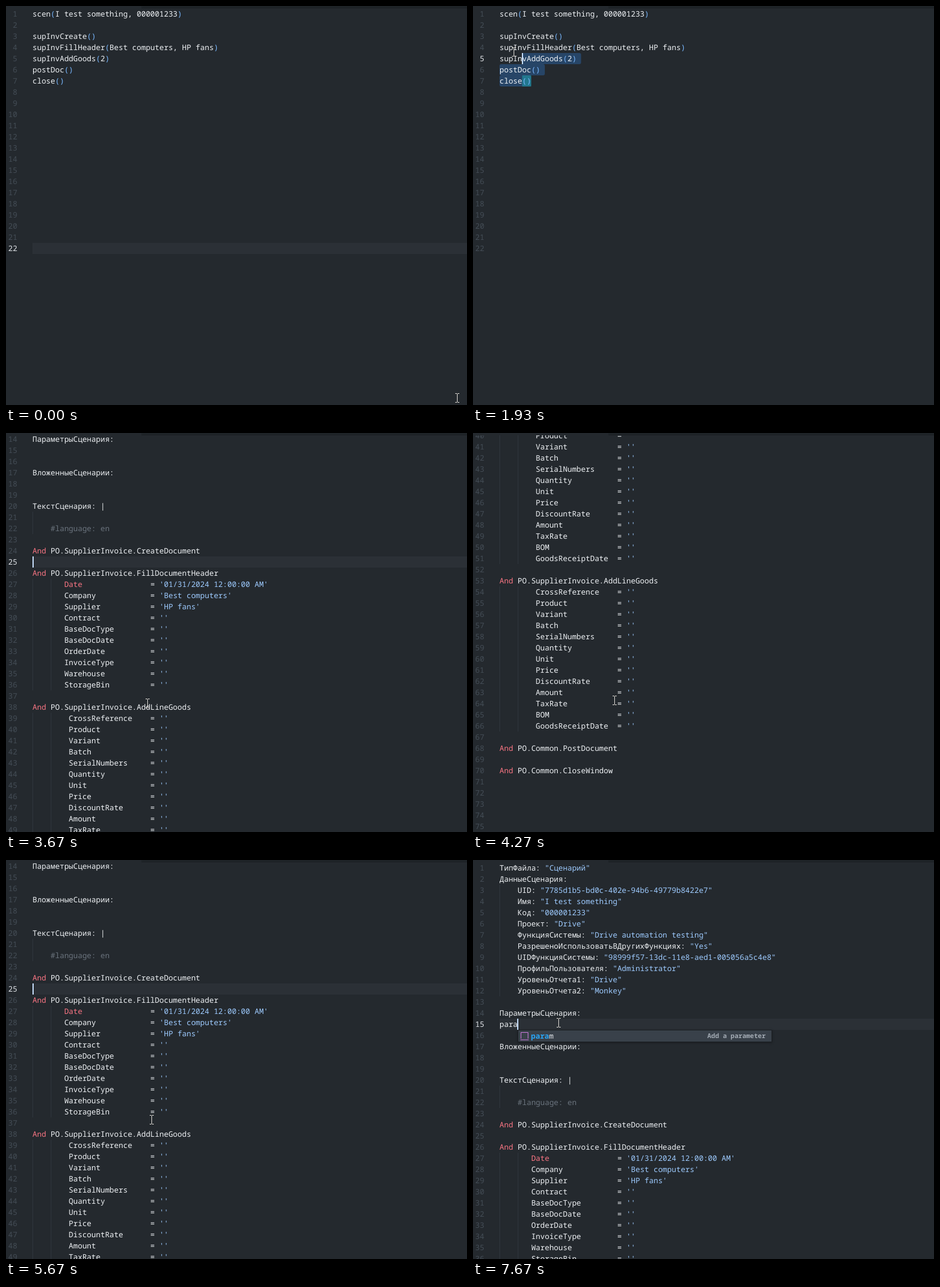
Write an HTML page with a canvas that moves like this. It is 783 by 679 pixels and loops after 8000 ms.

```html
<!DOCTYPE html>
<html lang="en">
<head>
<meta charset="utf-8">
<title>Scenario editor</title>
<style>
  html, body { margin: 0; width: 100%; height: 100%; overflow: hidden; background: #24292e; }
  canvas { display: block; }
</style>
</head>
<body>
<canvas id="stage" width="783" height="679"></canvas>
<script>
const ctx = document.getElementById('stage').getContext('2d');
const W = 783, H = 679, TOP = 4, ROW = 19, LEFT = 45, CH = 7.698;
const LOOP = 8000, TICKS_PER_MS = 15 / 1000;
const FAMILY = '"Noto Sans Mono", "DejaVu Sans Mono", monospace';
const FONT = `12.83px ${FAMILY}`;
const C = {
  bg: '#24292e', text: '#f0f3f6', string: '#9ecbff', keyword: '#f97583',
  comment: '#6a737d', bracket: '#79b8ff', number: '#444d56', guide: '#2f363d',
  line: '#2b3036', select: 'rgba(51,146,255,.27)', match: 'rgba(23,229,230,.31)',
  caret: '#c8e1ff', hit: '#2aa5f5'
};

// ---- documents ----
const blanks = n => Array(n).fill('');
const field = (indent, name, value = '') =>
  ' '.repeat(indent) + name.padEnd(26 - indent) + `= '${value}'`;

const script = [
  'scen(I test something, 000001233)', '',
  'supInvCreate()',
  'supInvFillHeader(Best computers, HP fans)',
  'supInvAddGoods(2)',
  'postDoc()',
  'close()',
  ...blanks(15)
];

const goods = [
  'And PO.SupplierInvoice.AddLineGoods',
  ...('CrossReference Product Variant Batch SerialNumbers Quantity Unit Price ' +
    'DiscountRate Amount TaxRate BOM GoodsReceiptDate').split(' ').map(n => field(8, n)),
  ''
];

const scenario = [
  'ТипФайла: "Сценарий"',
  'ДанныеСценария:',
  '    UID: "7785d1b5-bd0c-402e-94b6-49779b8422e7"',
  '    Имя: "I test something"',
  '    Код: "000001233"',
  '    Проект: "Drive"',
  '    ФункцияСистемы: "Drive automation testing"',
  '    РазрешеноИспользоватьВДругихФункциях: "Yes"',
  '    UIDФункцияСистемы: "98999f57-13dc-11e8-aed1-005056a5c4e8"',
  '    ПрофильПользователя: "Administrator"',
  '    УровеньОтчета1: "Drive"',
  '    УровеньОтчета2: "Monkey"',
  '', 'ПараметрыСценария:', '', '',
  'ВложенныеСценарии:', '', '',
  'ТекстСценария: |', '',
  '    #language: en', '',
  'And PO.SupplierInvoice.CreateDocument', '',
  'And PO.SupplierInvoice.FillDocumentHeader',
  field(7, 'Date', '01/31/2024 12:00:00 AM'),
  field(7, 'Company', 'Best computers'),
  field(7, 'Supplier', 'HP fans'),
  ...'Contract BaseDocType BaseDocDate OrderDate InvoiceType Warehouse StorageBin'
    .split(' ').map(n => field(7, n)),
  '', ...goods, ...goods,
  'And PO.Common.PostDocument', '',
  'And PO.Common.CloseWindow',
  ...blanks(15)
];

// ---- motion, in ticks of 1/15 s ----
const mouseKeys = [
  [0, 766, 667], [4, 281, 349], [6, 281, 349], [18, 274, 369], [19, 274, 369],
  [23, 135, 112], [24, 135, 112], [26, 134, 135], [27, 134, 135], [28, 108, 110],
  [29, 69, 78], [30, 56, 45], [32, 42, 16], [35, 42, 16], [47, 239, 466],
  [49, 239, 466], [50, 240, 466], [52, 240, 466], [55, 240, 460], [63, 240, 459],
  [64, 240, 455], [70, 240, 453], [74, 240, 450], [84, 241, 446], [85, 247, 442],
  [89, 247, 442], [101, 145, 277]
];
const scrollKeys = [
  [52, 0], [55, 250], [57, 250], [60, 750], [64, 750], [70, 1000], [72, 1000],
  [74, 750], [82, 250], [85, 250], [87, 0]
];
const dragHeads = [[6, 8], [5, 5], [3, 2], [1, 1], [1, 0]];

function keyed(keys, t) {
  if (t <= keys[0][0]) return keys[0].slice(1);
  for (let i = 1; i < keys.length; i++) {
    const a = keys[i - 1], b = keys[i];
    if (t <= b[0]) {
      const p = (t - a[0]) / (b[0] - a[0]);
      return a.slice(1).map((v, j) => v + (b[j + 1] - v) * p);
    }
  }
  return keys[keys.length - 1].slice(1);
}

function mouseAt(t) {
  if (t < 7 || t > 17) return keyed(mouseKeys, t);
  const a = 0.92 - (t - 6) / 12 * 6.22;   // one sweep around the code
  return [181.5 + 173.5 * Math.cos(a), 210 + 198.5 * Math.sin(a)];
}

function typedAt(t) {
  return 'para'.slice(0, [107, 110, 113, 115].filter(k => t >= k).length);
}

function stateAt(t) {
  const s = { doc: script, scroll: Math.round(keyed(scrollKeys, t)[0]), typed: '' };
  if (t < 28) {
    s.active = 22;
  } else if (t < 36) {
    const [line, col] = dragHeads[Math.min(t - 28, 4)];
    s.active = line;
    s.caret = col;
    s.sel = [line, col, 7, 7];
  } else {
    s.doc = scenario;
    if (t < 48) {
      s.active = 1;
      s.sel = [1, 0, scenario.length, 0];
    } else {
      s.active = t < 101 ? 25 : 15;
      s.typed = typedAt(t);
      s.caret = s.typed.length;
    }
  }
  return s;
}

// ---- drawing ----
function rect(x, y, w, h, color) {
  ctx.fillStyle = color;
  ctx.fillRect(x, y, w, h);
}

function print(str, x, y, color) {
  ctx.fillStyle = color;
  ctx.fillText(str, x, y);
}

const TOKENS = /("[^"]*"|'[^']*'|^And\b|\bDate\b|#.*|[()])/;

function tokenColor(tok) {
  if (/^["']/.test(tok)) return C.string;
  if (tok === 'And' || tok === 'Date') return C.keyword;
  if (tok[0] === '#') return C.comment;
  return tok === '(' || tok === ')' ? C.bracket : C.text;
}

function drawCode(line, y) {
  let col = 0;
  for (const tok of line.split(TOKENS)) {
    if (tok.trim()) print(tok, LEFT + col * CH, y + 14, tokenColor(tok));
    col += tok.length;
  }
}

function drawGuides(doc, i, y) {
  const line = doc[i] || (doc[i + 1] || '').startsWith('    #') && doc[i + 1] || '';
  const indent = line.length - line.trimStart().length;
  if (indent >= 4) rect(LEFT, y, 1, ROW, C.guide);
  if (indent >= 7) rect(LEFT + 31, y, 1, ROW, C.guide);
}

function drawSelection([l1, c1, l2, c2], line, n, y) {
  if (n < l1 || n > l2) return;
  const from = n === l1 ? c1 : 0, to = n === l2 ? c2 : line.length + 1;
  if (to <= from) return;
  ctx.fillStyle = C.select;
  ctx.beginPath();
  ctx.roundRect(LEFT + from * CH, y, (to - from) * CH, ROW, 3);
  ctx.fill();
  for (let c = from; c < Math.min(to, line.length); c++) {
    if (line[c] === ' ') rect(LEFT + c * CH + 3, y + 10, 1.5, 1.5, 'rgba(225,228,232,.22)');
  }
}

function drawEditor(s) {
  ctx.save();
  ctx.beginPath();
  ctx.rect(0, TOP, W, H - TOP);
  ctx.clip();
  ctx.font = FONT;
  const first = Math.floor(s.scroll / ROW);
  const last = Math.min(s.doc.length, first + 38);
  for (let i = first; i < last; i++) {
    const n = i + 1, y = TOP + i * ROW - s.scroll, on = n === s.active;
    const line = on && s.typed ? s.typed : s.doc[i];
    if (on && !s.sel) rect(LEFT, y, W - LEFT, ROW, C.line);
    drawGuides(s.doc, i, y);
    if (s.sel) {
      drawSelection(s.sel, line, n, y);
      if (s.doc === script && n === 7) rect(LEFT + 5 * CH, y, 2 * CH, ROW, C.match);
    }
    drawCode(line, y);
    print(n, 19.1 - String(n).length * CH, y + 14, on ? '#e1e4e8' : C.number);
    if (on && s.caret !== undefined) {
      rect(Math.floor(LEFT + s.caret * CH), y, 2, ROW, C.caret);
    }
  }
  ctx.restore();
}

function drawTabEdge() {
  rect(230, 0, W - 230, 3, '#1f2428');
  rect(230, 3, W - 230, 1, '#1b1f23');
}

// ---- suggestions ----
const suggestions = {
  p: ['param', 'postDoc', 'supInvCreate', 'supInvFillHeader', 'supInvAddGoods', 'openDoc', 'repeat'],
  pa: ['param', 'supInvCreate', 'supInvFillHeader', 'supInvAddGoods'],
  par: ['param', 'supInvFillHeader'],
  para: ['param']
};

function drawIcon(x, y) {
  ctx.strokeStyle = '#d07ae0';
  ctx.lineWidth = 1;
  ctx.beginPath();
  ctx.moveTo(x + .5, y + 11);
  ctx.lineTo(x + .5, y + .5);
  ctx.lineTo(x + 12.5, y + .5);
  ctx.lineTo(x + 12.5, y + 11);
  ctx.stroke();
  for (let i = 0; i < 13; i += 2) rect(x + i, y + 12, 1, 2, '#d07ae0');
}

function drawLabel(label, typed, x, y) {
  let hit = 0;
  [...label].forEach((ch, i) => {
    const on = hit < typed.length && ch.toLowerCase() === typed[hit];
    if (on) hit++;
    ctx.font = (on ? 'bold ' : '') + FONT;
    print(ch, x + i * CH, y, on ? C.hit : '#e1e4e8');
  });
}

function drawPopup(typed) {
  const items = suggestions[typed];
  const x = Math.round(LEFT + typed.length * CH), y = 289, w = 432;
  const h = items.length * ROW + 2;
  ctx.save();
  ctx.shadowColor = 'rgba(0,0,0,.36)';
  ctx.shadowBlur = 4;
  ctx.shadowOffsetY = 1;
  rect(x, y, w, h, '#1b1f23');
  ctx.restore();
  rect(x + 1, y + 1, w - 2, h - 2, C.bg);
  rect(x + 1, y + 1, w - 2, ROW, '#39414a');
  items.forEach((label, i) => {
    const ry = y + 1 + i * ROW;
    drawIcon(x + 5, ry + 3);
    drawLabel(label, typed, x + 22.5, ry + 14);
  });
  ctx.font = `bold 11px ${FAMILY}`;
  ctx.textAlign = 'right';
  print('Add a parameter', x + w - 11, y + 14, '#a3abb4');
  ctx.textAlign = 'left';
}

function drawMouse([mx, my]) {
  const x = Math.round(mx), y = Math.round(my), color = '#e4e0da';
  rect(x, y - 7, 1, 14, color);
  for (const sy of [y - 8, y + 7]) {
    rect(x - 3, sy, 3, 1, color);
    rect(x + 1, sy, 3, 1, color);
  }
}

function draw(now) {
  const t = Math.floor((now % LOOP + 4) * TICKS_PER_MS) % 120;
  const s = stateAt(t);
  ctx.textRendering = 'geometricPrecision';
  rect(0, 0, W, H, C.bg);
  drawEditor(s);
  drawTabEdge();
  if (s.typed && t >= 108) drawPopup(s.typed);
  drawMouse(mouseAt(t));
}

const start = performance.now();
function frame() {
  draw(performance.now() - start);
  requestAnimationFrame(frame);
}
frame();
</script>
</body>
</html>
```
